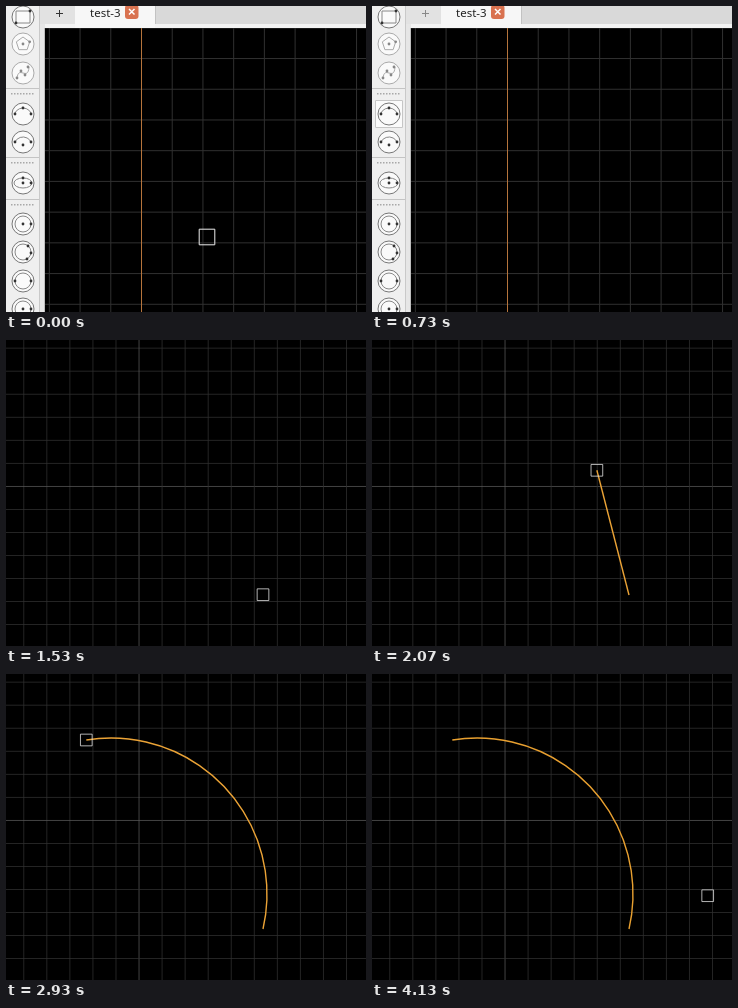
Animation of 360x306 px, one loop 4.27 s. Source, as an HTML page with a canvas:

```html
<!DOCTYPE html>
<html lang="en">
<head>
<meta charset="utf-8">
<title>Drawing an arc through three points</title>
<style>
html, body { margin: 0; width: 100%; height: 100%; overflow: hidden; background: #000; }
canvas { display: block; }
</style>
</head>
<body>
<canvas id="stage" width="360" height="306"></canvas>
<script>
const ctx = document.getElementById('stage').getContext('2d');
const LOOP = 4270, STEP = 1000 / 15;
const GRID = 30.72, AXIS_X = 135, META_Y = 328.5;

// Cursor path: [step, x, y] in stage pixels
const PATH = [
  [0, 201, 231], [6, 70, 136], [8, 49, 120], [17, 47, 110], [18, 53, 112],
  [23, 257, 254.7], [25, 257, 254.7], [32, 223, 123], [33, 230, 126.7], [36, 136, 82],
  [41, 82, 66], [44, 80.3, 66], [59, 80.3, 66], [62, 335.7, 221.7], [65, 335.7, 221.7]
];
const START = { x: 257, y: 255 }, THROUGH = { x: 230, y: 126.7 }, END = { x: 80.3, y: 66 };

const lerp = (a, b, k) => a + (b - a) * k;
const smooth = (n, from, to) => {
  const k = Math.min(1, Math.max(0, (n - from) / (to - from)));
  return k * k * (3 - 2 * k);
};

// Monotone cubic interpolation of one path coordinate
function along(n, axis) {
  const slope = i => i < 0 || i > PATH.length - 2 ? 0 :
    (PATH[i + 1][axis] - PATH[i][axis]) / (PATH[i + 1][0] - PATH[i][0]);
  const tangent = i => {
    const a = slope(i - 1), b = slope(i);
    return a * b > 0 ? 2 * a * b / (a + b) : 0;
  };
  let i = 0;
  while (i < PATH.length - 2 && n >= PATH[i + 1][0]) i++;
  const h = PATH[i + 1][0] - PATH[i][0], k = (n - PATH[i][0]) / h;
  const s = k * k * (3 - 2 * k);
  return lerp(PATH[i][axis], PATH[i + 1][axis], s) +
    h * k * (1 - k) * (tangent(i) * (1 - k) - tangent(i + 1) * k);
}

function rect(color, x, y, w, h) {
  ctx.fillStyle = color;
  ctx.fillRect(x, y, w, h);
}

function stroke(color, width, build) {
  ctx.strokeStyle = color;
  ctx.lineWidth = width;
  ctx.beginPath();
  build();
  ctx.stroke();
}

const circle = (x, y, r, from = 0, to = 2 * Math.PI) => ctx.arc(x, y, r, from, to);

function dots(color, points) {
  ctx.fillStyle = color;
  for (const [x, y] of points) {
    ctx.beginPath();
    circle(x, y, 1.4);
    ctx.fill();
  }
}

function icon(y, shape, points, color = '#333') {
  ctx.save();
  ctx.translate(17, y);
  ctx.fillStyle = '#fafafa';
  ctx.beginPath();
  circle(0, 0, 11);
  ctx.fill();
  stroke(color === '#333' ? '#777' : '#aaa', 1, () => circle(0, 0, 11));
  stroke(color === '#333' ? '#888' : '#aaa', 1, shape);
  dots(color, points);
  ctx.restore();
}

function handle(y) {
  rect('#c4c4c4', 0, y - 5, 33, 1);
  for (let x = 5; x < 29; x += 3) rect('#a8a8a8', x, y, 1.5, 1.5);
}

function toolbar(hover) {
  rect('#efefef', 0, 0, 34, 900);
  rect('#c9c9c9', 33, 0, 1, 900);
  [87, 156, 198].forEach(handle);
  if (hover) {
    rect('#fbfbfb', 3, 94, 28, 28);
    stroke('#c6c6c6', 1, () => ctx.rect(3.5, 94.5, 27, 27));
  }
  const pentagon = [0, 1, 2, 3, 4].map(i => {
    const a = i * 2 * Math.PI / 5 - Math.PI / 2;
    return [7 * Math.cos(a), 7 * Math.sin(a)];
  });
  const ring = () => circle(0, 0, 8);
  icon(11, () => ctx.rect(-7, -6, 14, 12), [[-7, 6], [7, -6]]);
  icon(38, () => {
    pentagon.forEach(p => ctx.lineTo(...p));
    ctx.closePath();
  }, [[0, 0], pentagon[1]], '#888');
  icon(67, () => {
    ctx.moveTo(-6, 6);
    ctx.bezierCurveTo(-5, -9, 5, 9, 6, -6);
  }, [[-6, 5], [-2, -2], [2, 2], [5, -6]], '#888');
  icon(108, () => circle(0, 3, 9, Math.PI * 1.12, Math.PI * 1.88), [[-8, 0], [0, -6], [8, 0]]);
  icon(136, () => circle(0, 4, 9, Math.PI * 1.15, Math.PI * 1.85), [[-8, 0], [0, 3], [8, 0]]);
  icon(177, () => ctx.ellipse(0, 0, 9, 5, 0, 0, 2 * Math.PI), [[0, 0], [0, -5], [8, 0]]);
  icon(218, ring, [[0, 0], [8, 0]]);
  icon(246, ring, [[5, -6], [8, 1], [4, 7]]);
  icon(275, ring, [[-8, 0], [8, 0]]);
  icon(303, ring, [[0, 0], [8, 0]]);
}

function tabs(plusColor) {
  rect('#d9d9d9', 34, 0, 900, 19);
  rect('#f3f3f3', 34, 18, 900, 4);
  rect('#e2e2e2', 34, 0, 35, 18);
  rect('#f7f7f7', 69, 0, 80, 22);
  rect('#c2c2c2', 149, 0, 1, 18);
  stroke(plusColor, 1, () => {
    ctx.moveTo(50, 7.5); ctx.lineTo(57, 7.5);
    ctx.moveTo(53.5, 4); ctx.lineTo(53.5, 11);
  });
  ctx.fillStyle = '#222';
  ctx.font = '11.5px "Noto Sans", "Open Sans", sans-serif';
  ctx.fillText('test-3', 84, 11);
  ctx.fillStyle = '#d97250';
  ctx.beginPath();
  ctx.roundRect(119, -1, 13.5, 14, 3);
  ctx.fill();
  stroke('#fff', 1.5, () => {
    ctx.moveTo(123, 3); ctx.lineTo(128.5, 8.5);
    ctx.moveTo(128.5, 3); ctx.lineTo(123, 8.5);
  });
}

// Drawn in canvas units, so that lines thin out as the view zooms
function grid() {
  for (let i = -3; i < 30; i++) {
    const color = i % 10 === 0 ? '#585858' : '#303030';
    rect(color, 0, META_Y + (i - 10) * GRID, 900, 1);
    rect(color, AXIS_X + i * GRID, 0, 1, 900);
  }
  rect('#b5743c', AXIS_X, 0, 1, 900);
}

function arcThrough(a, b, c) {
  const bx = b.x - a.x, by = b.y - a.y, cx = c.x - a.x, cy = c.y - a.y;
  const d = 2 * (bx * cy - by * cx), b2 = bx * bx + by * by, c2 = cx * cx + cy * cy;
  const ux = (cy * b2 - by * c2) / d, uy = (bx * c2 - cx * b2) / d;
  ctx.arc(a.x + ux, a.y + uy, Math.hypot(ux, uy),
    Math.atan2(-uy, -ux), Math.atan2(cy - uy, cx - ux), true);
}

function drawArc(n, cursor) {
  if (n < 26) return;
  if (n <= 33) {
    stroke('#eba336', 1.4, () => {
      ctx.moveTo(START.x, START.y);
      ctx.lineTo(cursor.x, cursor.y);
    });
  } else {
    const done = n >= 47;
    stroke(done ? '#e8a030' : '#eba336', 1.4,
      () => arcThrough(START, THROUGH, done ? END : cursor));
  }
}

function draw(n) {
  const k = smooth(n, 18, 23);
  const zoom = lerp(1, 0.75, k), dx = -199 * k, dy = -100.4 * k;
  const cursor = { x: along(n, 1), y: along(n, 2) };
  const inToolbar = n >= 9 && n <= 16;

  rect('#000', 0, 0, 360, 306);
  ctx.save();
  ctx.transform(zoom, 0, 0, zoom, dx, dy);
  grid();
  tabs(n >= 9 ? '#888' : '#333');
  rect('#e6e6e6', 34, 18, 5, 900);
  rect('#bdbdbd', 38, 22, 1, 900);
  toolbar(inToolbar);
  ctx.restore();

  drawArc(n, cursor);
  if (!inToolbar) {
    const size = 15.6 * zoom;
    stroke('#eee', zoom, () => ctx.rect(cursor.x - size / 2, cursor.y - size / 2, size, size));
  }
}

function tick() {
  draw(Math.floor((performance.now() % LOOP + 4) / STEP));
  requestAnimationFrame(tick);
}
tick();
</script>
</body>
</html>
```
